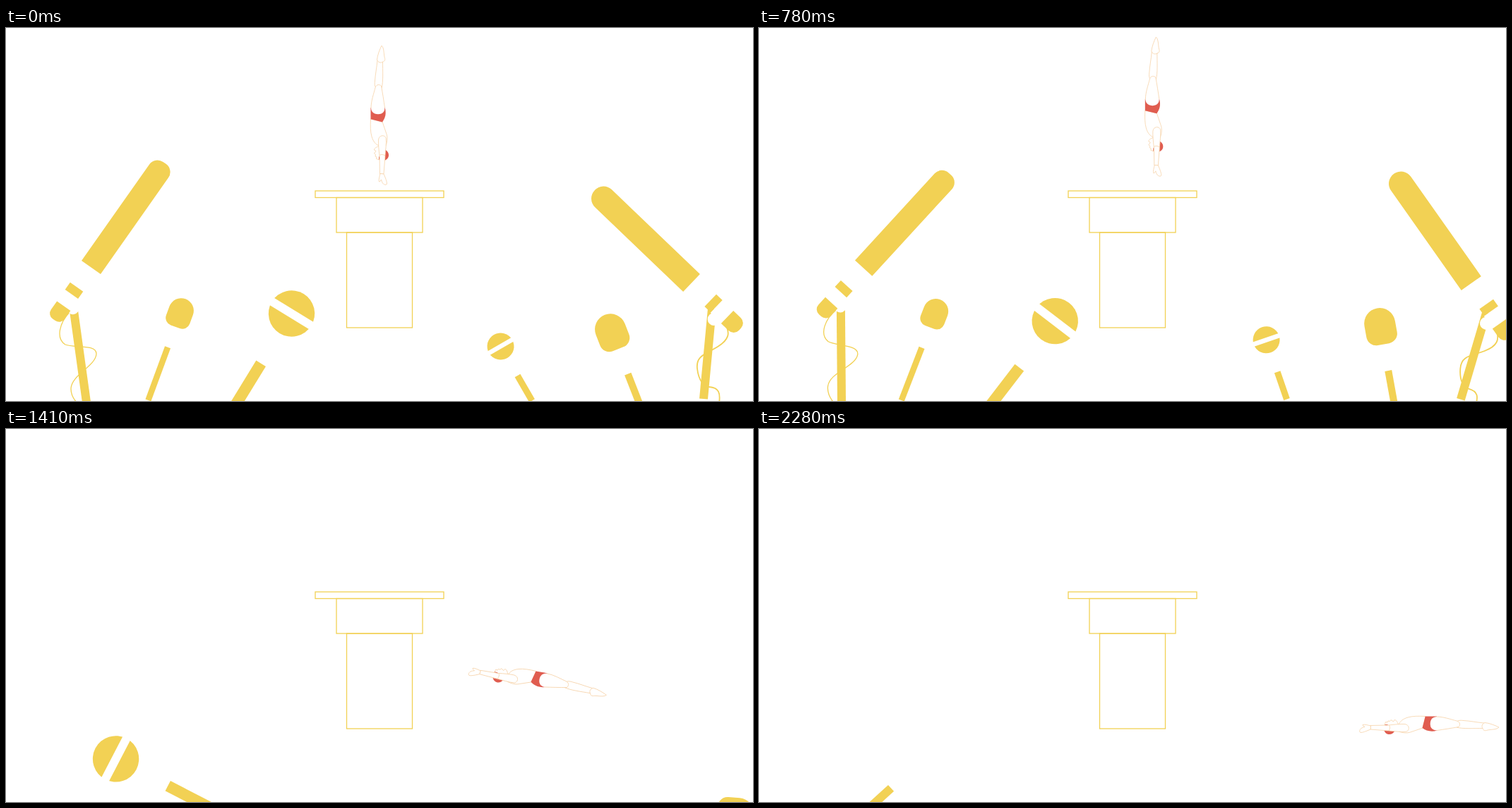
An HTML page for the animation above (6060 ms loop, 1058 by 529 pixels).

```html
<!DOCTYPE html>
<html lang="en">
<head>
<meta charset="utf-8">
<title>Diver and microphones</title>
<style>
html, body { margin: 0; width: 100%; height: 100%; overflow: hidden; background: #fff; }
svg { display: block; width: 100%; height: 100%; }
.gold { fill: #f2d154; }
.line { fill: none; stroke: #f2d154; stroke-width: 1.3; }
.skin { fill: #fff; stroke: #f6d2a8; stroke-width: .8; stroke-linejoin: round; }
.red { fill: #e05d50; }
.white { fill: #fff; }
</style>
</head>
<body>
<svg viewBox="0 0 1058 529">
  <g class="line">
    <rect x="438" y="231" width="182" height="9.5"/>
    <rect x="468" y="240.5" width="122" height="49.5"/>
    <rect x="482.5" y="290" width="93" height="135"/>
  </g>
  <g id="mics"></g>
  <g id="diver">
    <path class="skin" d="M526 46C525 57 523 66 522.5 75C522 79 522 82 523.5 84C527 81 530 82 532 85C534.500 77 533.500 60 533.500 48Z"/>
    <path class="skin" d="M532 25C529 31 526 39 525.500 45C527 49 531 50 533.500 48C537 47 537.300 45 536 41C535 36 535.500 28 532 25Z"/>
    <path class="skin" d="M516.500 129C516 139 516 147 518 154C520 161 524 166 529 167H538C540.500 160 540.500 154 538.500 149L533 133Z"/>
    <path class="skin" d="M529 167C526 169 522 169 521.500 173L524 174.500L521.500 178L523.500 179.500L523 182L525 183L524.500 185.500L529 187H537V170Z"/>
    <path class="red" d="M516.500 113V129.300L533 133.500C537 128 539.200 121 536.500 112.500Z"/>
    <path class="white" d="M517 111C516.500 118 520 122.300 527 122.300C534 122.300 537 118 536.300 111Z"/>
    <path class="skin" d="M517 114C517 103 521 93 523.200 84C525 79.500 529 80 531.500 82C533.500 93 535 103 536.500 113"/>
    <path class="red" d="M537 172.500C540 174 542 177 542 180C542 184 540 186 537 187.500ZM530.500 180L528 183V187L530 185Z"/>
    <path class="skin" d="M529.500 207L529 181C528 173 527.300 165 527.500 159C528 151 537.500 151 538.300 157C539 164 537.500 174 537 181L535 207Z"/>
    <path class="skin" d="M530 206.500C529 211 527.500 215 528.500 218C530 218.500 530.500 216 531.500 215C532.500 219 534 222.300 538 222.300C541 222 538.500 216 537.500 213L535 207Z"/>
    <path class="skin" d="M529 180.500C531 179 534 179 537 181" fill="none"/>
  </g>
</svg>
<script>
const $ = id => document.getElementById(id);
const LOOP = 6060, STEP = 30;

const gold = d => `<path class="gold" d="${d}"/>`;
const rect = (x, y, w, h, cls = 'gold') =>
  `<rect class="${cls}" x="${x}" y="${y}" width="${w}" height="${h}"/>`;
const place = (x, y, deg, body) => `<g transform="translate(${x} ${y}) rotate(${deg})">${body}</g>`;

// Bar along x whose far end (x1) is rounded
function bar(x0, x1, top, bottom, r) {
  const s = Math.sign(x1 - x0), sweep = s > 0 ? 1 : 0;
  const arc = (dx, dy) => `a${r} ${r} 0 0 ${sweep} ${dx} ${dy}`;
  return gold(`M${x0} ${top}H${x1 - s * r}${arc(s * r, r)}V${bottom - r}${arc(-s * r, r)}H${x0}Z`);
}

const stem = (w, from, to) => rect(-w / 2, from, w, to - from);

function capsule(w, h, r) {
  const a = w / 2, t = a - h / 2;
  return gold(`M${-a} ${t}A${a} ${a} 0 0 1 ${a} ${t}V${h / 2 - r}a${r} ${r} 0 0 1 ${-r} ${r}` +
    `H${r - a}a${r} ${r} 0 0 1 ${-r} ${-r}Z`);
}

const ball = (r, band) => `<circle class="gold" r="${r}"/>` +
  rect(-r - 1, -band / 2, 2 * r + 2, band, 'white');

const pole = (x1, y1, x2, y2) =>
  `<path d="M${x1} ${y1}L${x2} ${y2}" stroke="#f2d154" stroke-width="12"/>`;
const cable = (d, w) => `<path class="line" style="stroke-width:${w}" d="${d}"/>`;
const joint = (x, y) => `<circle class="white" cx="${x}" cy="${y}" r="9"/>`;

const bigLeft =
  cable('M90 403C76 418 70 440 84 449C96 454 128 448 128 462C127 480 92 492 92 512C92 522 97 528 102 533', 1.3) +
  pole(96, 401, 127.5, 628) +
  place(120.5, 339.5, -54.9,
    rect(-67, -12, 20, 24, 'white') + joint(-62, 12) + bar(0, 181, -16.5, 16.5, 14) +
    rect(-47, -12, 12.5, 22.5) + bar(-67, -91, -12, 11.5, 9.5));

const bigRight =
  cable('M1017 418C1027 432 1024 442 1008 452C990 463 977 465 979 483C981 500 988 508 996 509C1010 510 1012 518 1010 532', 1.8) +
  pole(1000, 398, 988, 526) +
  place(971, 361.5, -136.2,
    rect(-70, -12, 21.5, 24.5, 'white') + joint(-58.6, -15.3) + bar(0, 190, -17.2, 17.2, 17) +
    rect(-48.5, -11.5, 12, 24) + bar(-70, -95, -12.5, 12.5, 10.5));

// Pivot, swing direction (-1 left side, 1 right side), falling speed in deg/ms
const mics = [
  { x: 126, y: 553, side: -1, speed: .1465, art: bigLeft },
  { x: 194, y: 549, side: -1, speed: .201,
    art: place(247, 404, 20.2, capsule(35.5, 42, 11) + stem(8.5, 52, 132)) },
  { x: 309.3, y: 552.3, side: -1, speed: .1588,
    art: place(404.5, 405, 31.5, ball(32.7, 12) + stem(16, 83, 154)) },
  { x: 757, y: 540.4, side: 1, speed: .2,
    art: place(700.5, 451.5, -30, ball(19, 6.5) + stem(9, 48, 89)) },
  { x: 910, y: 542.7, side: 1, speed: .16,
    art: place(857.5, 431, -21.3, capsule(44, 52, 14) + stem(10, 64, 109)) },
  { x: 987, y: 557, side: 1, speed: .14, art: bigRight }
];
$('mics').innerHTML = mics.map(m => `<g>${m.art}</g>`).join('');
mics.forEach((m, i) => m.node = $('mics').children[i]);

const clamp = (v, a, b) => Math.min(b, Math.max(a, v));
const span = (t, a, b) => clamp((t - a) / (b - a), 0, 1);
const mix = (a, b, u) => a + (b - a) * u;
const curve = (a, c, b, u) => mix(mix(a, c, u), mix(c, b, u), u);

// Wind up, then fall outwards at a steady rate
function swing({ side, speed }, t) {
  const fall = from => Math.max(0, Math.min(t, 1680) - from) * speed;
  if (side < 0) return 25 * span(t, 420, 660) - fall(660);
  return -25 * span(t, 420, 625) + 50 * span(t, 625, 840) + fall(840);
}

// Centre and rotation of the diver: hop, tumble, dive, glide
function dive(t) {
  if (t < 840) {
    const u = span(t, 660, 840);
    return [mix(534.5, 580, u), mix(123.7, 105.5, u), 0];
  }
  if (t < 1170) {
    const u = span(t, 840, 1170);
    return [curve(580, 644, 707, u), curve(105.5, 166, 244.5, u), 109.5 * u];
  }
  if (t < 1680) {
    const u = span(t, 1170, 1680);
    return [curve(707, 750, 817, u), curve(244.5, 397, 432.4, u), mix(109.5, 90, u)];
  }
  const u = span(t, 1680, 2280);
  return [mix(817, 949.3, u), mix(432.4, 425.5, u), 90];
}

function draw(ms) {
  const t = Math.floor((ms % LOOP) / STEP) * STEP;
  for (const m of mics) m.node.setAttribute('transform', `rotate(${swing(m, t)} ${m.x} ${m.y})`);
  const [x, y, r] = dive(t);
  $('diver').setAttribute('transform', `translate(${x} ${y}) rotate(${r}) translate(-534.5 -123.7)`);
}

const start = performance.now();
function tick() {
  draw(performance.now() - start);
  requestAnimationFrame(tick);
}
tick();
</script>
</body>
</html>
```
